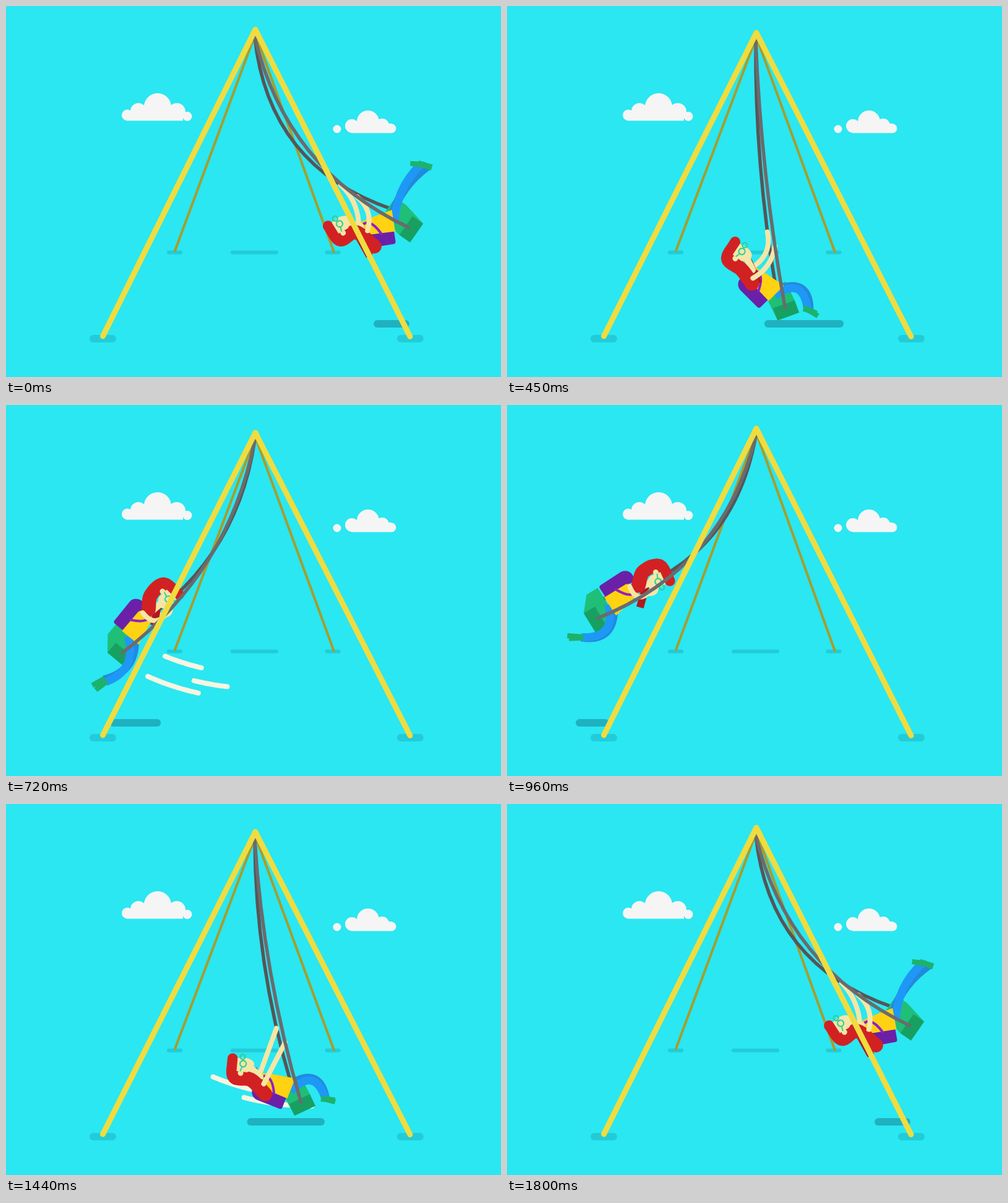
An HTML page with a canvas that plays this animation: 800x600 px, repeating every 1.83 s.

```html
<!DOCTYPE html>
<html lang="en">
<head>
<meta charset="utf-8">
<title>Swing</title>
<style>
html, body { margin: 0; width: 100%; height: 100%; overflow: hidden; background: #2ae7f1; }
canvas { display: block; }
</style>
</head>
<body>
<canvas id="stage" width="800" height="600"></canvas>
<script>
const ctx = document.getElementById('stage').getContext('2d');
const LOOP = 1830, TURN = 960, STEP = 30, PIVOT = [403, 50];

const C = {
  sky: '#2ae7f1', cloud: '#f5f5f5', pad: '#23cbd8', shade: '#1fb1c0',
  pole: '#f0dc3f', farPole: '#a69d2b', rope: '#6b6b6d', farRope: '#555658',
  hair: '#d22123', farHair: '#b0191f', skin: '#f5e6a6', glass: '#2fcf9c',
  shirt: '#ffd212', pack: '#6b20a8', strap: '#9020c6',
  jean: '#1e98f6', farJean: '#2389dd', seat: '#1fbf77', seatFront: '#17a062',
  shoe: '#1db26c', whoosh: '#f8f5e1'
};

// Key poses; angles in degrees, everything else follows from them.
const KEYS = [0, 450, 720, 960, 1260, 1590];
const SWING = [39, 6.2, -31.6, -41.2, -24.7, 33.8];
const LEAN = [-99, -45, 39, 57, 0, -104];
const THIGH = [-88, -36, 73, 75, 8, -80];
const SHIN = [-44, 82, 159, 181, 137, 15];
const SHADE = [623, 480, 209, 138, 260, 588];

// radius, first and last angle of each whoosh
const BACK = [[385, -1.6, -24.6], [426, 2, -27], [408, 3.2, -16]];
const FORTH = [[413, -18.4, 2.8], [391, -11.5, 13.1], [429, -15.1, 16.5]];

const rad = d => d * Math.PI / 180;
const clamp = v => Math.max(0, Math.min(1, v));
const mix = (a, b, u) => a + (b - a) * u;
const add = (p, x, y) => [p[0] + x, p[1] + y];
const reach = (p, deg, len) => add(p, len * Math.cos(rad(deg)), len * Math.sin(rad(deg)));
const place = (o, deg, x, y) => reach(reach(o, deg, x), deg + 90, y);
const hang = (deg, r) => reach(PIVOT, 90 - deg, r);
const bezier = ([a, b, c], u) => [0, 1].map(k => mix(mix(a[k], b[k], u), mix(b[k], c[k], u), u));

// Smooth periodic curve through the keys, without overshoot.
function curve(v, t) {
  const n = KEYS.length, wrap = k => (k + n) % n;
  let i = n - 1;
  while (KEYS[i] > t) i--;
  const time = k => KEYS[wrap(k)] + Math.floor(k / n) * LOOP;
  const val = k => v[wrap(k)];
  const span = k => time(k + 1) - time(k);
  const slope = k => (val(k + 1) - val(k)) / span(k);
  const tangent = k => {
    const p = slope(k - 1), q = slope(k), a = span(k - 1), b = span(k);
    if (p * q <= 0) return 0;
    const m = (b * p + a * q) / (a + b);
    return Math.sign(m) * Math.min(Math.abs(m), 3 * Math.abs(p), 3 * Math.abs(q));
  };
  const h = span(i), u = (t - KEYS[i]) / h, w = 1 - u;
  return val(i) * (1 + 2 * u) * w * w + val(i + 1) * (3 - 2 * u) * u * u
    + h * (tangent(i) * u * w * w - tangent(i + 1) * u * u * w);
}

function spline(p, n = 20) {
  const out = [], last = p.length - 1;
  for (let i = 0; i < last; i++) {
    const b = p[i], c = p[i + 1];
    const a = p[i - 1] || [2 * b[0] - c[0], 2 * b[1] - c[1]];
    const d = p[i + 2] || [2 * c[0] - b[0], 2 * c[1] - b[1]];
    for (let j = 0; j <= n; j++) {
      const u = j / n;
      out.push([0, 1].map(k => 0.5 * (2 * b[k] + (c[k] - a[k]) * u
        + (2 * a[k] - 5 * b[k] + 4 * c[k] - d[k]) * u * u
        + (3 * b[k] - a[k] - 3 * c[k] + d[k]) * u * u * u)));
    }
  }
  return out;
}

function trace(pts) {
  ctx.beginPath();
  pts.forEach(p => ctx.lineTo(...p));
}
function fill(pts, color) {
  trace(pts);
  ctx.closePath();
  ctx.fillStyle = color;
  ctx.fill();
}
function ink(color, width, cap = 'round') {
  ctx.strokeStyle = color;
  ctx.lineWidth = width;
  ctx.lineCap = cap;
  ctx.lineJoin = 'round';
  ctx.stroke();
}
function line(pts, color, width, cap) {
  trace(pts);
  ink(color, width, cap);
}
function bend([a, b, c], color, width, cap) {
  ctx.beginPath();
  ctx.moveTo(...a);
  ctx.quadraticCurveTo(...b, ...c);
  ink(color, width, cap);
}
function bar(x, y, w, h, color) {
  const half = (w - h) / 2;
  line([[x - half, y], [x + half, y]], color, h);
}
function dots(list, color) {
  ctx.fillStyle = color;
  ctx.beginPath();
  for (const [x, y, r] of list) {
    ctx.moveTo(x + r, y);
    ctx.arc(x, y, r, 0, 7);
  }
  ctx.fill();
}
function within(o, deg, draw) {
  ctx.save();
  ctx.translate(...o);
  ctx.rotate(rad(deg));
  draw();
  ctx.restore();
}

function clouds() {
  dots([[196, 176.5, 9], [214, 170, 13], [245, 163, 22], [276, 171, 14], [293, 178.5, 7.5]], C.cloud);
  ctx.fillRect(196, 170, 90, 15.5);
  dots([[535, 199, 6.5], [559, 194, 11], [585, 187, 18], [608, 193, 11], [623, 198, 7.5]], C.cloud);
  ctx.fillRect(558, 190, 65, 15.5);
}

function whoosh(arcs, drift, from, to) {
  if (to <= from) return;
  for (const [r, a, b] of arcs) {
    const pts = [];
    for (let i = 0; i <= 16; i++) {
      const deg = mix(a, b, mix(from, to, i / 16));
      pts.push(hang(deg, r + drift * deg));
    }
    line(pts, C.whoosh, 8);
  }
}

// A slack rope bows out further the higher the swing goes.
function slack(a, b, bow) {
  const dx = b[0] - a[0], dy = b[1] - a[1], k = 2 * bow / Math.hypot(dx, dy);
  return [a, [(a[0] + b[0]) / 2 - dy * k, (a[1] + b[1]) / 2 + dx * k], b];
}

// The closer the hand, the more the elbow sticks out.
function arm(shoulder, hand) {
  const d = Math.hypot(hand[0] - shoulder[0], hand[1] - shoulder[1]);
  const out = 0.43 * Math.sqrt(Math.max(0, 72 * 72 - d * d));
  bend(slack(shoulder, hand, out / 2), C.skin, 8);
}

function leg(hip, thigh, shin, size, color) {
  const knee = reach(hip, thigh, size), ankle = reach(knee, shin, size);
  const flex = 0.55 * (shin - 180) - 8, foot = shin + flex;
  bend([hip, knee, ankle], color, 13, 'butt');
  const heel = reach(ankle, foot, -8 * Math.abs(Math.sin(rad(flex))));
  fill([[0, 5], [0, -5], [23, -3.5], [23, 4.5]].map(p => place(heel, foot, ...p)), C.shoe);
}

function drawSeat(o, deg, depth) {
  const q = [[-18.5, -10.5], [18.5, -10.5], [18.5, 10.5], [-18.5, 10.5]].map(p => place(o, deg, ...p));
  const back = q.map(p => add(p, ...depth));
  fill(back, C.seat);
  q.forEach((p, i) => {
    const j = (i + 1) % 4;
    fill([p, q[j], back[j], back[i]], C.seat);
  });
  fill(q, C.seatFront);
}

function torso() {
  ctx.fillStyle = C.pack;
  ctx.beginPath();
  ctx.roundRect(-38, -57, 24, 56, [14, 6, 4, 4]);
  ctx.fill();
  fill([[-18, 1], [17, 1], [10, -35], [4, -57], [-9, -55], [-17, -40]], C.shirt);
  bend([[-3, -54], [14, -38], [-18, -22]], C.strap, 4);
}

function face() {
  ctx.fillStyle = C.skin;
  ctx.beginPath();
  ctx.moveTo(-13, -9);
  ctx.lineTo(8, -10);
  ctx.lineTo(10, 3);
  ctx.quadraticCurveTo(9, 17, 1, 18);
  ctx.quadraticCurveTo(-9, 17, -13, 8);
  ctx.fill();
  dots([[-15.5, -2, 4.5]], C.skin);
  line([[-5, -1], [-12, -3]], C.glass, 2);
  for (const [x, r] of [[0, 5], [11, 4]]) {
    ctx.beginPath();
    ctx.arc(x, -x / 5, r, 0, 7);
    ink(C.glass, 2.2);
  }
}

function hair(eye, head, lean) {
  const nape = place(eye, head, -24, 16);
  const tip = add(nape, 6 - lean / 4, 23);
  const pts = spline([place(eye, head, 6, -18), place(eye, head, -23, -12), nape, tip]);
  dots(pts.map((p, i) => [...p, 8.5 + 3 * Math.min(1, 2 * i / pts.length)]), C.hair);
}

function render(t) {
  const swing = curve(SWING, t), lean = curve(LEAN, t);
  const thigh = curve(THIGH, t), shin = curve(SHIN, t);
  const low = 1 - (swing / 40) ** 2;
  const half = t < TURN ? t / TURN : (t - TURN) / (LOOP - TURN);
  const top = 38 + 8 * Math.sin(Math.PI * half ** 1.6) ** 2;

  const seat = hang(swing, 446 - 0.03 * swing * swing);
  const tilt = -1.4 * swing - 12 * low;
  const depth = [-12 - 0.4 * swing, -30];
  const hip = place(seat, tilt - 9, 0, -33);
  const eye = place(hip, lean, 8, -86), head = 1.2 * lean;
  const hook = [402, top + 12], knot = place(seat, tilt, 0, -5);
  const rope = slack(hook, knot, -1.22 * swing * -1 * -1 * -1);
  const farRope = slack(hook, add(knot, ...depth), 1.45 * swing);

  ctx.fillStyle = C.sky;
  ctx.fillRect(0, 0, 800, 600);
  clouds();
  for (const x of [156.5, 653.5]) bar(x, 538, 43, 12, C.pad);
  for (const x of [272.5, 528]) bar(x, 398.5, 25, 6, C.pad);
  bar(401.5, 398.5, 77, 6, C.pad);
  bar(curve(SHADE, t), 514, 54 + 76 * Math.max(0, low), 12, C.shade);
  line([[273, 396], [403, top + 7], [530, 398]], C.farPole, 4);

  whoosh(BACK, 0, clamp((t - 630) / 180), clamp((t - 560) / 178));
  whoosh(FORTH, 1.6, clamp((t - 1320) / 300), clamp((t - 1215) / 265));

  bend(farRope, C.farRope, 5.5);
  arm(place(hip, lean, 7, -55), bezier(farRope, 0.77));
  drawSeat(seat, tilt, depth);
  leg(place(hip, lean, 8, -1), thigh + 17, shin + 8, 52, C.farJean);
  leg(place(hip, lean, -5, 2), thigh, shin, 56, C.jean);

  within(hip, lean, torso);
  const lock = place(eye, head, -6, 17);
  line([lock, add(lock, 4 - 0.27 * lean, 22 + Math.abs(lean) / 3)], C.farHair, 12, 'butt');
  line([place(eye, head, -3, 10), place(hip, lean, -1, -53)], C.skin, 11);
  hair(eye, head, lean);
  within(eye, head, face);
  arm(place(hip, lean, -10, -43), bezier(rope, 0.77));
  bend(rope, C.rope, 5.5);

  line([[156.5, 534], [403, top], [653, 534.5]], C.pole, 9);
}

const start = performance.now();
function tick() {
  const t = (performance.now() - start) % LOOP;
  render(Math.floor(t / STEP) * STEP);
  requestAnimationFrame(tick);
}
tick();
</script>
</body>
</html>
```
